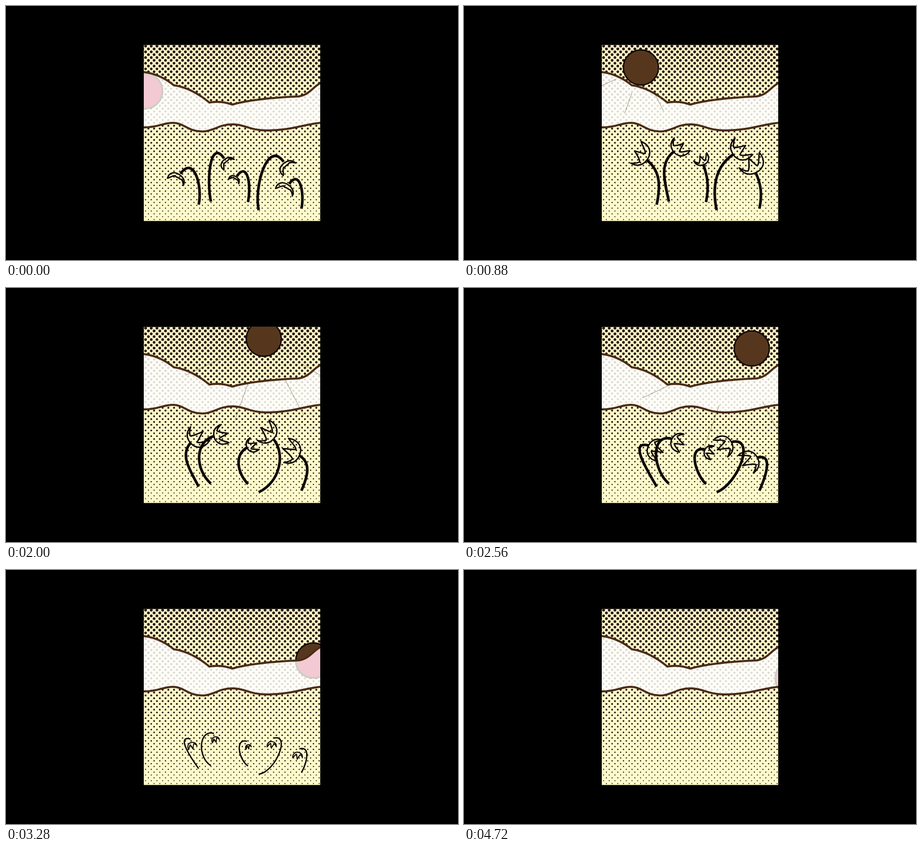
An HTML page with a canvas that plays this animation: 889x500 px, repeating every 4.8 s.

```html
<!DOCTYPE html>
<html lang="en">
<head>
<meta charset="utf-8">
<title>Sun and flowers</title>
<style>
  html, body { margin: 0; width: 100%; height: 100%; overflow: hidden; background: #000; }
  canvas { display: block; width: 889px; height: 500px; }
</style>
</head>
<body>
<canvas id="stage" width="889" height="500"></canvas>
<script>
const LOOP = 4800, TICK = 80;
const BOX = [271, 76.5, 347, 347];
const INK = '#0c0603', BROWN = '#56371e', LINE = '#4a2b16';

const canvas = document.getElementById('stage');
const ctx = canvas.getContext('2d');

const rad = deg => deg * Math.PI / 180;
const clamp = v => Math.min(1, Math.max(0, v));
const mix = (a, b, u) => a + (b - a) * u;
const smooth = u => u * u * (3 - 2 * u);
const span = (t, from, to) => clamp((t - from) / (to - from));
// Point at a distance from (x, y); 0 degrees is up, clockwise.
const polar = (x, y, r, deg) => [x + r * Math.sin(rad(deg)), y - r * Math.cos(rad(deg))];

// ---- landscape ----
const TOP = 'M271 130 Q303 134 330 156 Q365 161 400 190 Q423 186 445 194 ' +
  'C480 184 530 180 575 178 C595 176 603 160 618 152';
const BOTTOM = 'C590 232 560 245 515 245 C478 245 472 233 445 233 ' +
  'C418 233 408 247 386 247 C358 247 350 230 328 230 C308 230 300 239 271 239';
const topEdge = new Path2D(TOP);
const bottomEdge = new Path2D('M618 230 ' + BOTTOM);
const hill = new Path2D(TOP + ' L618 230 ' + BOTTOM + ' Z');

function clipBox(g) {
  g.beginPath();
  g.rect(...BOX);
  g.clip();
}

function makeBackdrop() {
  const layer = document.createElement('canvas');
  layer.width = 889;
  layer.height = 500;
  const g = layer.getContext('2d');
  clipBox(g);
  g.fillStyle = '#fefacb';
  g.fillRect(...BOX);
  g.fillStyle = '#2b170c';
  const pitch = 347 / 31, rows = 62;
  for (let row = 0; row < rows; row++) {
    const y = 79 + row * pitch / 2;
    const r = mix(2.8, 1, row / rows);
    for (let col = -1; col < 32; col++) {
      g.beginPath();
      g.arc(274.5 + (col + row % 2 / 2) * pitch, y, r, 0, 7);
      g.fill();
    }
  }
  g.fillStyle = 'rgba(255,255,255,.84)';
  g.fill(hill);
  return layer;
}
const backdrop = makeBackdrop();

// ---- sun: time, x, y along its arc ----
const ARC = [[0, 273, 167.5], [880, 348, 121], [1360, 404, 100], [2000, 507, 100],
  [2560, 566, 119], [3280, 604.5, 178], [4720, 647, 213]];

function sunAt(t) {
  const last = ARC.length - 1;
  let i = 0;
  while (i < last - 1 && t >= ARC[i + 1][0]) i++;
  const a = ARC[i], b = ARC[i + 1], d = b[0] - a[0];
  const before = ARC[Math.max(0, i - 1)], after = ARC[Math.min(last, i + 2)];
  const u = clamp((t - a[0]) / d), v = 1 - u;
  return [1, 2].map(c => {
    const ma = (b[c] - before[c]) / (b[0] - before[0]);
    const mb = (after[c] - a[c]) / (after[0] - a[0]);
    return mix(a[c], b[c], smooth(u)) + d * u * v * (v * ma - u * mb);
  });
}

function disc(x, y, fill, edge, width) {
  ctx.beginPath();
  ctx.arc(x, y, 34.5, 0, 7);
  ctx.fillStyle = fill;
  ctx.fill();
  ctx.strokeStyle = edge;
  ctx.lineWidth = width;
  ctx.stroke();
}

function drawSun(x, y) {
  disc(x, y, BROWN, '#150b05', 2.8);
  ctx.save();
  ctx.clip(hill);
  disc(x, y, '#f3c9d3', '#cfcfc4', 3.4);
  ctx.restore();
}

// Rays slide outward and lengthen, then lag behind the setting sun.
function drawRays(t, x, y) {
  if (t <= 640 || t >= 3040) return;
  const age = t - 640, lag = Math.max(0, t - 2000);
  const cx = x - lag * .05, cy = y + lag * .018;
  ctx.strokeStyle = 'rgba(95,90,45,.65)';
  ctx.lineWidth = 1;
  for (const deg of [123, 152.5, 199.5, 245]) {
    ctx.beginPath();
    ctx.moveTo(...polar(cx, cy, 45 + age * .033, deg));
    ctx.lineTo(...polar(cx, cy, 80 + age * .066, deg));
    ctx.stroke();
  }
}

// ---- flowers ----
// dx, h: tip above the root when upright; side: where it droops at first;
// tilt: upright angle; lean: angle of the lower stem once it bows
const flowers = [
  { x: 379, y: 391, dx: -16, h: 92, size: .95, side: -1, tilt: -35, lean: -30 },
  { x: 403, y: 385, dx: 6, h: 100, size: .8, side: 1, tilt: 35, lean: -50 },
  { x: 476, y: 386, dx: -2, h: 77, size: .6, side: -1, tilt: 3, lean: -45 },
  { x: 497, y: 402, dx: 29, h: 112, size: .95, side: 1, tilt: 40, lean: 68 },
  { x: 581, y: 399, dx: -4, h: 74, size: 1, side: -1, tilt: -3, lean: 24 }
];

function headPath(s, open) {
  const p = new Path2D();
  const k = s * mix(.8, 1, open);
  const curve = (...v) => p.bezierCurveTo(...v.map((n, i) => n * (i % 2 ? k : s)));
  const peak = mix(7, -19, open);
  p.moveTo(-27 * s, -5 * k);
  curve(-24, 13, -14, 19, 0, 19);
  curve(18, 19, 30, 5, 24, -17);
  curve(18, -9, 16, 3, 9, 7);
  curve(6, 3, 3, mix(7, peak, .6), -1, peak);
  curve(-5, mix(7, peak, .5), -8, 6, -13, 9);
  curve(-17, 7, -22, 3, -27, -5);
  p.closePath();
  return p;
}

function drawFlowers(t) {
  const rise = Math.sin(span(t, 0, 1360) * Math.PI / 2);
  const bowTime = span(t, 1360, 2560), bow = smooth(bowTime);
  const wilt = smooth(span(t, 2560, 3280));
  const fade = span(t, 3280, 4720);
  if (fade === 1) return;
  const pose = (droop, upright, bowed) => mix(mix(droop, upright, rise), bowed, bow);

  ctx.strokeStyle = INK;
  ctx.lineJoin = 'round';
  for (const f of flowers) {
    const turn = -Math.sign(f.lean);
    const h = f.h * (1 - .28 * wilt);
    const bend = pose(145 * f.side, f.tilt, 105 * turn);
    const tipX = pose(f.dx + 20 * f.side, f.dx, f.dx);
    const tipY = -h * pose(f.side < 0 ? .66 : .85, 1, .88);
    const lean = mix(-12 * f.side, f.lean * (1 + .2 * wilt), clamp(bowTime * 1.8));
    const size = f.size * pose(.7, 1, .87) * mix(1, .42, wilt) * (1 - fade);
    const headAngle = bend + turn * (12 * bow + 50 * wilt);
    const curl = h * (.25 + .25 * Math.abs(Math.sin(rad(bend / 2))));

    ctx.save();
    ctx.translate(f.x, f.y);
    ctx.scale(1 - .3 * fade, 1 - .3 * fade);
    ctx.beginPath();
    ctx.moveTo(0, 0);
    ctx.bezierCurveTo(...polar(0, 0, h * .42, lean), ...polar(tipX, tipY, -curl, bend), tipX, tipY);
    ctx.lineWidth = mix(5.2, 2.6, wilt) * (1 - fade);
    ctx.stroke();
    ctx.translate(...polar(tipX, tipY, 19 * size + 7 * wilt, headAngle));
    ctx.rotate(rad(headAngle));
    ctx.lineWidth = mix(2.7, 2, wilt) * (1 - fade);
    ctx.stroke(headPath(size, rise));
    ctx.restore();
  }
}

function draw(t) {
  const [x, y] = sunAt(t);
  ctx.fillStyle = '#000';
  ctx.fillRect(0, 0, 889, 500);
  ctx.drawImage(backdrop, 0, 0);
  ctx.save();
  clipBox(ctx);
  drawRays(t, x, y);
  drawSun(x, y);
  ctx.strokeStyle = LINE;
  ctx.lineWidth = 4;
  ctx.stroke(topEdge);
  ctx.stroke(bottomEdge);
  drawFlowers(t);
  ctx.restore();
}

// The picture moves on most ticks and rests on three of every twelve.
const rests = tick => tick > 5 && tick < 58 && [2, 7, 10].includes(tick % 12);

const start = performance.now();
function frame() {
  const elapsed = Math.max(0, performance.now() - start) % LOOP;
  let tick = Math.floor(elapsed / TICK);
  if (rests(tick)) tick--;
  draw(tick * TICK);
  requestAnimationFrame(frame);
}
frame();
</script>
</body>
</html>
```
